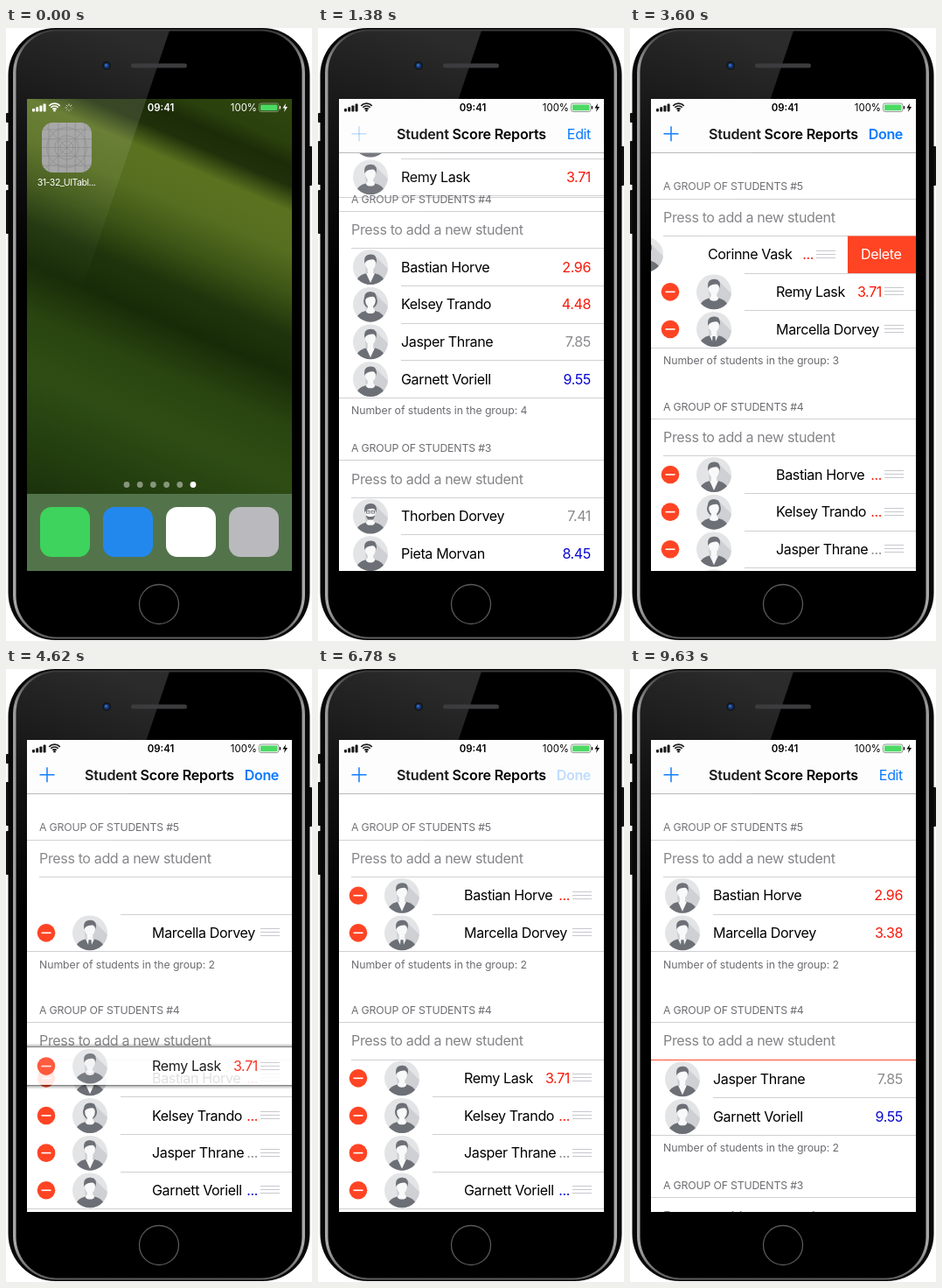
These frames come from a looping animation (350x700 px, 9.66 s). An HTML page with a canvas:

```html
<!DOCTYPE html>
<html lang="en">
<head>
<meta charset="utf-8">
<title>Student Score Reports</title>
<style>
html, body { margin: 0; width: 100%; height: 100%; overflow: hidden; background: #fff; }
canvas { display: block; width: 350px; height: 700px; }
</style>
</head>
<body>
<canvas id="stage"></canvas>
<script>
const LOOP = 9660, ROW = 42.65;
const L = 24, R = 327, T = 81, B = 620, W = R - L;
const FONT = 'Inter, "Open Sans", sans-serif';
const RED = '#ff4424', BLUE = '#0a7aff', LINE = '#d0d0d4', GREY = '#6d6d72';
const canvas = document.getElementById('stage');
const ctx = canvas.getContext('2d');
const dpr = window.devicePixelRatio || 1;
canvas.width = 350 * dpr;
canvas.height = 700 * dpr;

const people = {
  corinne: { name: 'Corinne Vask', score: '3.92', look: 'tee' },
  remy: { name: 'Remy Lask', score: '3.71', look: 'tee' },
  marcella: { name: 'Marcella Dorvey', score: '3.38', look: 'tie' },
  bastian: { name: 'Bastian Horve', score: '2.96', look: 'vee' },
  kelsey: { name: 'Kelsey Trando', score: '4.48', look: 'bob' },
  jasper: { name: 'Jasper Thrane', score: '7.85', look: 'vee' },
  garnett: { name: 'Garnett Voriell', score: '9.55', look: 'tee' },
  thorben: { name: 'Thorben Dorvey', score: '7.41', look: 'glasses' },
  pieta: { name: 'Pieta Morvan', score: '8.45', look: 'tee' },
  alma: { name: 'Alma Reston', score: '6.12', look: 'vee' }
};

// timing helpers
const lerp = (a, b, u) => a + (b - a) * u;
const ramp = (t, a, b) => Math.min(1, Math.max(0, (t - a) / (b - a)));
const ease = (t, a, b) => { const u = ramp(t, a, b); return u * u * (3 - 2 * u); };
const pulse = (t, a, b, c, d) => ramp(t, a, b) * (1 - ramp(t, c, d));
const step = (t, first, ...changes) => {
  let v = first;
  for (const [at, next] of changes) if (t >= at) v = next;
  return v;
};

// drawing helpers
function text(s, x, y, size, color, { weight = 400, align = 'left', gap = -0.39 } = {}) {
  ctx.font = `${weight} ${size}px ${FONT}`;
  ctx.letterSpacing = gap + 'px';
  ctx.textAlign = align;
  ctx.fillStyle = color;
  ctx.fillText(s, x, y + size * 0.36);
}
function measure(s) {
  ctx.font = `400 16.1px ${FONT}`;
  ctx.letterSpacing = '-0.39px';
  return ctx.measureText(s).width;
}
function box(x, y, w, h, r, fill) {
  ctx.beginPath();
  ctx.roundRect(x, y, w, h, r);
  ctx.fillStyle = fill;
  ctx.fill();
}
function poly(points, fill) {
  ctx.beginPath();
  points.forEach(([x, y]) => ctx.lineTo(x, y));
  ctx.closePath();
  ctx.fillStyle = fill;
  ctx.fill();
}
function oval(x, y, rx, ry, fill) {
  ctx.beginPath();
  ctx.ellipse(x, y, rx, ry, 0, 0, 7);
  ctx.fillStyle = fill;
  ctx.fill();
}
function rule(x, y, color = LINE) {
  ctx.fillStyle = color;
  ctx.fillRect(x, Math.round(y), R - x, 1);
}
function clipped(x, y, w, h, paint) {
  if (w <= 0 || h <= 0) return;
  ctx.save();
  ctx.beginPath();
  ctx.rect(x, y, w, h);
  ctx.clip();
  paint();
  ctx.restore();
}
function linear(x0, y0, x1, y1, stops) {
  const g = ctx.createLinearGradient(x0, y0, x1, y1);
  stops.forEach(([at, c]) => g.addColorStop(at, c));
  return g;
}

function avatar(x, y, look) {
  const dark = '#6c7076', skin = '#f9f9fa';
  ctx.save();
  ctx.translate(x, y);
  ctx.beginPath();
  ctx.arc(0, 0, 20, 0, 7);
  ctx.clip();
  ctx.fillStyle = '#e3e4e6';
  ctx.fillRect(-20, -20, 40, 40);
  poly([[4, -14], [22, 4], [22, 22], [-4, 20], [-6, 0]], '#cfd0d4');
  if (look === 'bob') oval(0, -4, 8, 8.5, dark);
  oval(0, 18.5, 16.5, 12, dark);
  box(-3.2, 0, 6.4, 9, 3, skin);
  if (look === 'vee' || look === 'tie') poly([[-5, 7], [5, 7], [0, 18]], skin);
  else oval(0, 7.5, 5, 2.8, skin);
  if (look === 'tie') poly([[-1.5, 8], [1.5, 8], [2.2, 17], [0, 20], [-2.2, 17]], dark);
  oval(0, -4.5, 5.8, 8, skin);
  ctx.beginPath();
  ctx.moveTo(-6.6, -4);
  ctx.quadraticCurveTo(-8.5, -15, 1, -14.5);
  ctx.quadraticCurveTo(8.5, -14, 6.6, -4);
  ctx.quadraticCurveTo(5.5, -9, 2, -8.8);
  ctx.quadraticCurveTo(-5.5, -8, -6.6, -4);
  ctx.fillStyle = dark;
  ctx.fill();
  if (look === 'glasses') {
    ctx.strokeStyle = dark;
    ctx.lineWidth = 0.9;
    ctx.strokeRect(-4.6, -6, 3.6, 2.6);
    ctx.strokeRect(1, -6, 3.6, 2.6);
    poly([[-5.5, -1], [-2, 0.5], [2, 0.5], [5.5, -1], [3, 4], [-3, 4]], dark);
  }
  ctx.restore();
}

function scoreColor(s) {
  return s < 5 ? '#f81808' : s < 8 ? '#8a8a8d' : '#0808d0';
}

// one student row centred on y; p is the progress into editing
function content(who, y, p) {
  const { name, score, look } = people[who];
  if (p > 0) {
    ctx.save();
    ctx.globalAlpha *= p * p;
    const mx = lerp(10, 46, p);
    oval(mx, y, 10.3, 10.3, RED);
    ctx.fillStyle = '#fff';
    ctx.fillRect(mx - 5.5, y - 0.8, 11, 1.6);
    ctx.restore();
    const gx = lerp(329, 291, p);
    ctx.fillStyle = '#c7c7cf';
    for (const d of [-4, 0, 4]) ctx.fillRect(gx, Math.round(y + d) - 1, 22, 1);
  }
  avatar(lerp(60, 96, p), y, look);
  text(name, lerp(95, 167, p), y, 16.1, '#000');

  const w = measure(score), color = scoreColor(+score);
  const after = 167 + measure(name) + 7;
  const fits = after <= 288 - w;
  const right = lerp(312, 288, p);
  if (p < 1 || fits) {
    const x = lerp(312 - w, fits ? 288 - w : after, p);
    clipped(x, y - 15, right + 1 - x, 30, () => text(score, x, y, 16.1, color));
  } else if (after < 284) {
    text('...', 288, y, 16.1, color, { align: 'right' });
  }
}

function row({ who, h = 1, slide = 0, hidden = false }, top, p, last) {
  const height = h * ROW;
  if (height < 0.3) return top;
  clipped(L, top, W, height, () => {
    if (!hidden) {
      ctx.save();
      ctx.translate(-slide, 0);
      content(who, top + ROW / 2, p);
      ctx.restore();
    }
    if (slide > 0) {
      ctx.fillStyle = RED;
      ctx.fillRect(R - slide, top, slide, height);
      if (h > 0.95) text('Delete', R - slide + 15, top + ROW / 2, 16.1, '#fff');
    }
  });
  if (h > 0.4 && !last) rule(lerp(95, 131, Math.min(1, p * 1.4)), top + height - 0.4);
  return top + height;
}

// returns the centre of the next section title
function section(n, y, rows, count, gap, p) {
  text('A GROUP OF STUDENTS #' + n, 38, y, 12.3, GREY, { gap: -0.18 });
  let top = y + 13.7;
  rule(L, top);
  text('Press to add a new student', 38, top + ROW / 2, 16.1, '#858589');
  top += ROW;
  rule(38, top - 0.4);
  rows.forEach((r, i) => { top = row(r, top, p, i === rows.length - 1); });
  rule(L, top - 0.4);
  text('Number of students in the group: ' + count, 38, top + 14.6, 12.3, GREY, { gap: -0.07 });
  return top + gap;
}

// a lifted, slightly see-through row with shadows along both edges
function floating(who, y, lift, p) {
  const top = y - ROW / 2, bottom = y + ROW / 2;
  for (const [edge, out] of [[top, -5], [bottom, 5]]) {
    ctx.fillStyle = linear(0, edge, 0, edge + out, [
      [0, `rgba(0,0,0,${0.6 * lift})`], [0.4, `rgba(0,0,0,${0.2 * lift})`], [1, 'rgba(0,0,0,0)']
    ]);
    ctx.fillRect(L, Math.min(edge, edge + out), W, 5);
  }
  ctx.save();
  ctx.globalAlpha = lerp(1, 0.88, lift);
  ctx.fillStyle = '#fff';
  ctx.fillRect(L, top, W, ROW);
  content(who, y, p);
  ctx.restore();
}

function statusBar(color, busy, t) {
  for (let i = 0; i < 4; i++) box(30 + i * 4.2, 92 - i * 1.8, 3, 3.5 + i * 1.8, 0.8, color);
  ctx.strokeStyle = color;
  ctx.lineWidth = 1.7;
  for (const r of [3.2, 6, 8.8]) {
    ctx.beginPath();
    ctx.arc(55.5, 95, r, -Math.PI * 0.75, -Math.PI * 0.25);
    ctx.stroke();
  }
  oval(55.5, 94.3, 1.3, 1.3, color);
  if (busy) {
    ctx.lineWidth = 1;
    for (let i = 0; i < 8; i++) {
      const a = i * Math.PI / 4, q = (i + Math.floor(t / 90)) % 8;
      ctx.strokeStyle = `rgba(255,255,255,${0.2 + q * 0.09})`;
      ctx.beginPath();
      ctx.moveTo(72 + 2 * Math.cos(a), 91 + 2 * Math.sin(a));
      ctx.lineTo(72 + 4.5 * Math.cos(a), 91 + 4.5 * Math.sin(a));
      ctx.stroke();
    }
  }
  text('09:41', 177, 91, 11.4, color, { weight: 600, align: 'center', gap: 0 });
  text('100%', 287, 91, 11.4, color, { align: 'right', gap: 0 });
  ctx.strokeStyle = color;
  ctx.globalAlpha = 0.5;
  ctx.lineWidth = 0.8;
  ctx.beginPath();
  ctx.roundRect(289.5, 86, 22.5, 9.6, 2.5);
  ctx.stroke();
  ctx.globalAlpha = 1;
  box(291, 87.4, 19.5, 6.8, 1.3, '#4cd964');
  box(312.8, 89, 1.3, 3.6, 0.7, color);
  poly([[320, 86], [316.5, 91.5], [319, 91.5], [318, 96], [322, 90], [319.4, 90]], color);
}

function navBar(t) {
  ctx.fillStyle = '#fdfdfd';
  ctx.fillRect(L, T, W, 61);
  rule(L, 142, '#b4b4b6');
  statusBar('#000', false, t);
  ctx.globalAlpha = 1 - 0.75 * pulse(t, 1170, 1200, 1410, 1650);
  ctx.fillStyle = BLUE;
  ctx.fillRect(38.5, 120, 17, 1.6);
  ctx.fillRect(46.2, 112.3, 1.6, 17);
  ctx.globalAlpha = 1 - 0.75 * (pulse(t, 2160, 2220, 2370, 2520) + pulse(t, 6750, 6780, 6840, 6990));
  const editing = t >= 2370 && t < 6840;
  text(editing ? 'Done' : 'Edit', 312, 121, 16.1, BLUE, { align: 'right', weight: editing ? 600 : 400 });
  ctx.globalAlpha = 1;
  text('Student Score Reports', 175.5, 121, 16.1, '#000', { weight: 600, align: 'center', gap: -0.2 });
}

function app(t) {
  ctx.fillStyle = '#fff';
  ctx.fillRect(L, T, W, B - T);

  const p = ease(t, 2400, 2730) * (1 - ease(t, 6870, 7200));
  const added = ease(t, 1323, 1723);
  const moveA = ease(t, 4680, 4930), moveB = ease(t, 5790, 6040);
  const dragA = t >= 4140 && t < 5100, dragB = t >= 5200 && t < 6360;

  const gone1 = ease(t, 3750, 4080);
  const gone2 = ease(t, 7560, 7950);
  const gone3 = ease(t, 9330, 9660);
  const slide1 = 78 * ease(t, 3150, 3420) + (W - 78) * ease(t, 3600, 3750);
  const slide2 = W * ease(t, 7350, 7560);
  const slide3 = 100 * ease(t, 8250, 8850) + (W - 100) * ease(t, 8850, 9300);

  const top5 = [
    { who: 'corinne', h: 1 - gone1, slide: slide1 },
    { who: 'bastian', h: moveB, hidden: t < 6360 },
    { who: 'remy', h: 1 - moveA, hidden: t >= 4140 },
    { who: 'marcella' }
  ];
  const top4 = [
    { who: 'bastian', h: 1 - moveB, hidden: t >= 5200 },
    { who: 'remy', h: moveA * (1 - gone2), slide: slide2, hidden: t < 5100 },
    { who: 'kelsey', h: 1 - gone3, slide: slide3 },
    { who: 'jasper' },
    { who: 'garnett' }
  ];
  const top3 = [{ who: 'thorben' }, { who: 'pieta' }, { who: 'alma' }];
  const count5 = step(t, 3, [3750, 2], [5100, 1], [6510, 2]);
  const count4 = step(t, 4, [5100, 5], [6510, 4], [7560, 3], [9330, 2]);

  const full = 13.7 + ROW + 67 + ROW * top5.reduce((sum, r) => sum + (r.h ?? 1), 0);
  const y4 = 181 + full * added;
  if (t >= 1323) {
    clipped(L, 142, W, y4 - 143, () => section(5, 181 - 139 * (1 - added), top5, count5, 67, p));
    if (added < 1) rule(L, y4 - 2);
  }
  const y3 = section(4, y4, top4, count4, 57.5, p);
  if (y3 < 640) section(3, y3, top3, 3, 57.5, p);

  if (dragA) {
    const y = lerp(258.6, 470, ease(t, 4170, 4714)) - 2.7 * ease(t, 4870, 5070);
    floating('remy', y, pulse(t, 4140, 4230, 4950, 5100), p);
  }
  if (dragB) {
    const y = lerp(424.6, 255, ease(t, 5250, 6090)) + 3.6 * ease(t, 6120, 6330);
    floating('bastian', y, pulse(t, 5200, 5290, 6180, 6360), p);
  }
  navBar(t);
}

function appIcon(x, y, s) {
  box(x, y, s, s, s * 0.22, '#a0a0a0');
  ctx.save();
  ctx.beginPath();
  ctx.roundRect(x, y, s, s, s * 0.22);
  ctx.clip();
  ctx.strokeStyle = '#858585';
  ctx.lineWidth = 0.8;
  ctx.beginPath();
  for (const k of [0.14, 0.33, 0.5, 0.67, 0.86]) {
    ctx.moveTo(x + s * k, y);
    ctx.lineTo(x + s * k, y + s);
    ctx.moveTo(x, y + s * k);
    ctx.lineTo(x + s, y + s * k);
  }
  ctx.moveTo(x, y);
  ctx.lineTo(x + s, y + s);
  ctx.moveTo(x + s, y);
  ctx.lineTo(x, y + s);
  for (const k of [0.13, 0.24, 0.4]) {
    ctx.moveTo(x + s * (0.5 + k), y + s / 2);
    ctx.arc(x + s / 2, y + s / 2, s * k, 0, 7);
  }
  ctx.stroke();
  ctx.restore();
}

function home(t) {
  // lawn with slanting shadows
  ctx.fillStyle = linear(327, 81, 114, 577, [
    [0, '#31480f'], [0.09, '#2a400d'], [0.13, '#1c2c08'], [0.17, '#1f300a'],
    [0.22, '#5a7220'], [0.3, '#566e1f'], [0.38, '#3d5516'], [0.46, '#1f340b'],
    [0.54, '#182b08'], [0.64, '#2a4510'], [0.75, '#2e4d14'], [1, '#1a310b']
  ]);
  ctx.fillRect(L, T, W, B - T);
  appIcon(41, 108, 57);
  text('31-32_UITabl...', 69, 176, 10.6, '#fff', { align: 'center', gap: -0.5 });
  for (let i = 0; i < 6; i++) {
    oval(138 + i * 15.2, 521.5, 3.4, 3.4, i === 5 ? '#fff' : 'rgba(255,255,255,.45)');
  }
  ctx.fillStyle = '#53744b';
  ctx.fillRect(L, 532, W, B - 532);
  ['#3dd35c', '#2388ee', '#fff', '#b9b9be'].forEach((c, i) => box(39 + i * 72, 547, 57, 57, 13, c));
}

// the app grows out of its icon
function launch(t) {
  const z = 1 - Math.pow(1 - ramp(t, 60, 660), 3);
  ctx.save();
  const k = 1 + z * 1.6;
  ctx.translate(69, 136);
  ctx.scale(k, k);
  ctx.translate(-69, -136);
  home(t);
  ctx.restore();
  if (z > 0) {
    const x = lerp(41, L, z), y = lerp(108, T, z);
    const w = lerp(57, W, z), h = lerp(57, B - T, z);
    ctx.save();
    ctx.globalAlpha = ramp(z, 0, 0.45);
    box(x, y, w, h, 13 * (1 - z), '#fff');
    ctx.restore();
  }
  statusBar(z > 0.85 ? '#000' : '#fff', z < 0.85, t);
  const shown = ease(t, 660, 990);
  if (shown > 0) {
    // white veil lifting off the finished list
    app(t);
    ctx.fillStyle = `rgba(255,255,255,${1 - shown})`;
    ctx.fillRect(L, 100, W, B - 100);
  }
}

function body() {
  ctx.fillStyle = '#fff';
  ctx.fillRect(0, 0, 350, 700);
  box(0, 97, 6, 11, 1, '#111');
  box(0, 129, 6, 50, 1, '#111');
  box(0, 185, 6, 50, 1, '#111');
  box(344, 135, 6, 45, 1, '#111');
  box(2.5, 0, 345, 699, 54, '#080808');
  const rim = linear(0, 0, 0, 700, [
    [0, '#333'], [0.06, '#9a9a9c'], [0.5, '#a4a4a7'], [0.94, '#a8a8aa'], [1, '#555']
  ]);
  box(8, 1.5, 334, 696, 50, rim);
  box(11.5, 3.5, 327, 692, 47, '#000');
}

function face() {
  oval(115, 43, 5, 5, '#15171d');
  oval(115, 43, 3, 3, '#173a78');
  oval(114.5, 42.5, 1.2, 1.2, '#3f7fd0');
  box(143, 40.5, 64, 5, 2.5, '#3c3c3e');
  ctx.strokeStyle = '#58585a';
  ctx.lineWidth = 1.3;
  ctx.beginPath();
  ctx.arc(175, 658, 22.5, 0, 7);
  ctx.stroke();
}

function gloss() {
  ctx.save();
  ctx.beginPath();
  ctx.roundRect(11.5, 3.5, 327, 692, 47);
  ctx.clip();
  poly([[0, 0], [188, 0], [86, 302], [0, 302]], linear(60, 300, 160, 20, [
    [0, 'rgba(255,255,255,0)'], [0.5, 'rgba(255,255,255,.07)'], [1, 'rgba(255,255,255,.17)']
  ]));
  ctx.restore();
}

function draw() {
  const t = performance.now() % LOOP;
  ctx.setTransform(dpr, 0, 0, dpr, 0, 0);
  ctx.globalAlpha = 1;
  body();
  clipped(L, T, W, B - T, () => (t < 990 ? launch(t) : app(t)));
  gloss();
  face();
  requestAnimationFrame(draw);
}
draw();
</script>
</body>
</html>
```
